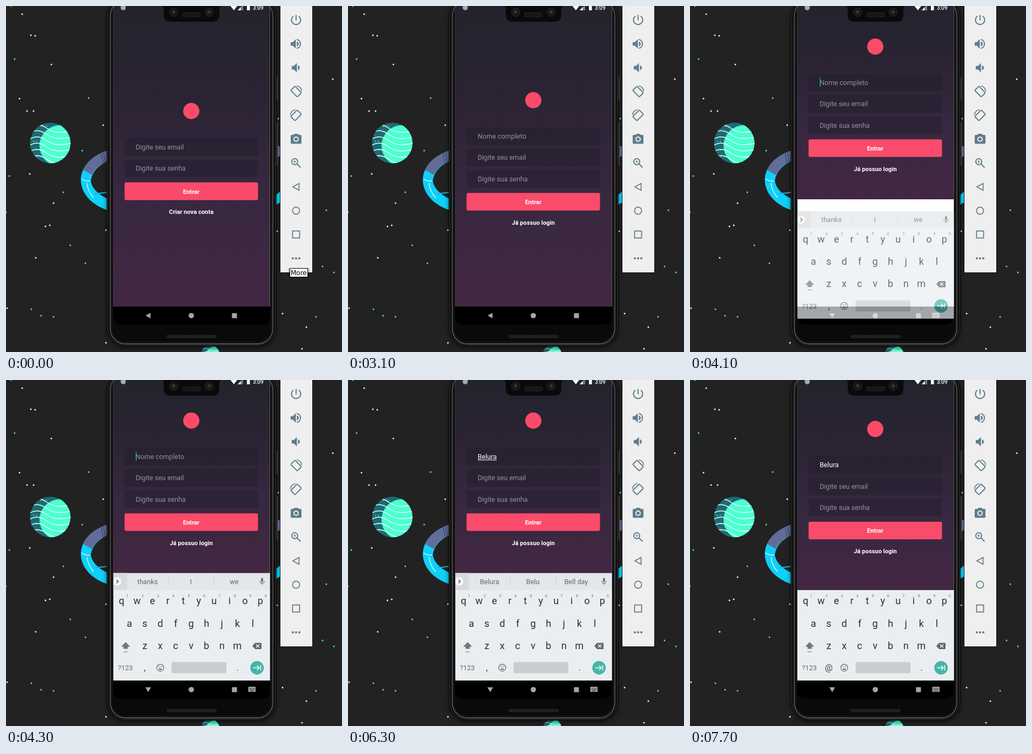
These frames come from a looping animation (622x639 px, 8 s). An HTML page:

```html
<!DOCTYPE html>
<html lang="pt">
<head>
<meta charset="utf-8">
<title>Login</title>
<style>
html, body { margin: 0; width: 100%; height: 100%; overflow: hidden; background: #222; }
svg { display: block; width: 622px; height: 639px; }
text { font-family: Roboto, sans-serif; }
.mid { text-anchor: middle; }
.field { font-size: 12.6px; fill: #fff; }
.hint { fill-opacity: .5; }
.bold { font-size: 11.2px; font-weight: 700; fill: #fff; }
.key { font-size: 18.2px; fill: #263238; }
.digit { font-size: 7.5px; fill: #6d787e; }
.small { font-size: 12.7px; fill: #5d696f; }
.tool { fill: none; stroke: #607d8b; stroke-width: 2; }
.tool .solid { fill: #607d8b; stroke: none; }
.body { filter: drop-shadow(0 3px 4px rgba(0, 0, 0, .55)); }
</style>
</head>
<body>
<svg viewBox="0 0 622 639">
  <defs>
    <linearGradient id="dusk" x1="0" y1="0" x2="0" y2="1">
      <stop offset="0" stop-color="#22242d"/>
      <stop offset=".3" stop-color="#2b2333"/>
      <stop offset=".6" stop-color="#36283f"/>
      <stop offset="1" stop-color="#432743"/>
    </linearGradient>
    <pattern id="mesh" width="4" height="4" patternUnits="userSpaceOnUse">
      <path d="M0 4L4 0" stroke="#3a3a3a"/>
    </pattern>
    <clipPath id="globe"><circle cx="82" cy="253" r="37.5"/></clipPath>
    <clipPath id="moon"><circle cx="378" cy="644" r="17.5"/></clipPath>
    <clipPath id="screen"><rect x="198.800" y="-8" width="289.700" height="596.500" rx="14"/></clipPath>
  </defs>

  <!-- wallpaper -->
  <rect width="622" height="639" fill="#222"/>
  <g id="stars"></g>
  <g clip-path="url(#globe)">
    <rect x="44" y="215" width="76" height="76" fill="#1c6b73"/>
    <circle cx="100" cy="258" r="38" fill="#4dffd1"/>
    <g id="waves" fill="none" stroke="#e9fffa" stroke-width="1.500"></g>
    <path d="M50 250h10M50 266h12M57 278h10M64 222h12" stroke="#bdeee6" stroke-width="1.500" stroke-dasharray="1.5 4"/>
  </g>
  <path d="M188 267C160 276 138 296 138.500 323C140 350 163 369 188 377V356C172 349 158 336 157 322C160 306 170 295 188 286Z" fill="#0fd0fa"/>
  <path d="M188 267C165 275 149 287 143 303L159 312C164 301 174 292 188 286Z" fill="#626c99"/>
  <path d="M176 273l4 17M180 271l4 17" stroke="#343c60" fill="none"/>
  <path d="M140 319q8 6 15 4M150 327q1 14 12 27" stroke="#d8f9ff" stroke-width="1.500" fill="none"/>
  <path d="M164 346l24-3v2l-22 3z" fill="#0fb4df"/>
  <path d="M500 259h7v18l-7 4z" fill="#626c99"/>
  <path d="M500 349l7-6v20l-7 4z" fill="#0fd0fa"/>
  <g clip-path="url(#moon)">
    <rect x="360" y="626" width="36" height="14" fill="#1c6b73"/>
    <circle cx="386" cy="645" r="16" fill="#4dffd1"/>
    <path d="M360 635q9-5 17 0t18 1M366 640q8-5 14 0" stroke="#e9fffa" fill="none"/>
  </g>

  <!-- phone -->
  <path d="M501.500 131v42M501.500 215v80" stroke="#484848" stroke-width="3"/>
  <g fill="none">
    <rect class="body" x="186.500" y="-14" width="314" height="642.500" rx="34" fill="#0c0c0c"/>
    <rect x="188.500" y="-12" width="310" height="638.500" rx="32" stroke="#383838"/>
    <rect x="193" y="-10" width="301" height="634" rx="28" stroke="#6c6c6c" stroke-width="1.300"/>
    <rect x="195.500" y="-8" width="296" height="629" rx="26" fill="#0a0a0a" stroke="#262626" stroke-width=".8"/>
  </g>
  <rect x="297" y="607.500" width="93" height="6" rx="3" fill="#171717"/>
  <rect x="297" y="607.500" width="93" height="6" rx="3" fill="url(#mesh)"/>

  <g clip-path="url(#screen)">
    <rect x="198" y="-8" width="291" height="563" fill="#fff"/>
    <rect id="app" x="198" y="0" width="291" fill="url(#dusk)"/>
    <rect x="198" y="555" width="291" height="34" fill="#000"/>
    <g fill="#a6a6a6">
      <path id="back"/>
      <circle cx="343" cy="571.800" r="4.900"/>
      <rect x="418.300" y="567.300" width="9.200" height="9.200"/>
      <g id="imeIcon"><rect x="448.500" y="566.500" width="13.500" height="9.500" rx="1"/>
        <path d="M450.500 569.500h10M450.500 571.700h10" stroke="#111" stroke-width="1.200" stroke-dasharray="1.200 1"/>
        <path d="M452 574.200h6.500" stroke="#111"/></g>
    </g>
    <g id="form"></g>
    <g id="keyboard">
      <rect x="198" y="388" width="291" height="167" fill="#eaeef1"/>
      <g id="bar">
        <rect x="198" y="356.500" width="291" height="31.500" fill="#e3e7ea"/>
        <rect x="198" y="356.500" width="26" height="31.500" fill="#d7dbdd"/>
        <circle cx="206" cy="372" r="7.500" fill="#fafafa"/>
        <path d="M204.500 368.700l3.300 3.300-3.300 3.300" fill="none" stroke="#444" stroke-width="1.400"/>
        <path d="M300.500 363v18M384.500 363v18" stroke="#cdd2d5"/>
        <rect x="472" y="365.500" width="4" height="8" rx="2" fill="#6d787e"/>
        <path d="M469.800 371.500a4.200 4.200 0 0 0 8.400 0M474 375.700v2.500" fill="none" stroke="#6d787e" stroke-width="1.200"/>
        <g id="words"></g>
      </g>
      <g id="keys"></g>
      <path d="M221.500 484l8.500 8.500h-4.500v4h-8v-4h-4.500z" fill="#6d787e"/>
      <path d="M217.500 502h8" stroke="#6d787e" stroke-width="1.200"/>
      <path d="M461 485.500h12v11.500h-12l-5-5.750z" fill="#5d696f"/>
      <path d="M463 488.500l6 5.500M469 488.500l-6 5.500" stroke="#fff" stroke-width="1.400"/>
      <text class="small mid" x="221" y="536">?123</text>
      <text class="mid" id="comma" x="257" y="537" font-size="16" fill="#37474f"></text>
      <g fill="none" stroke="#5d696f" stroke-width="1.200">
        <circle cx="285.500" cy="531.300" r="6.500"/>
        <path d="M282 533a3.700 3.700 0 0 0 7 0z" fill="#5d696f" stroke="none"/>
        <path d="M282.500 529.300h1.800M286.700 529.300h1.800" stroke-width="1.800"/>
      </g>
      <rect x="306.500" y="521" width="101.500" height="20.500" rx="2" fill="#c8cdd0"/>
      <text class="mid" x="428.500" y="537" font-size="16" fill="#37474f">.</text>
      <circle cx="464.700" cy="531.500" r="12.500" fill="#45b5a8"/>
      <path d="M457.500 531.500h11M464.700 527.300l4.200 4.200-4.200 4.200M471.500 526.800v9.400" fill="none" stroke="#fff" stroke-width="1.500"/>
    </g>
    <circle cx="217" cy="3" r="4.800" fill="#a9a9ad"/>
    <path d="M415.500 0h12.500l-6.200 8z" fill="#fff"/>
    <path d="M439 -3v11h-10z" fill="#77777d"/><path d="M434.500 2v6h-5.500z" fill="#fff"/>
    <rect x="446" y="-2" width="5.500" height="10" fill="#fff"/>
    <text x="457" y="7" font-size="10" font-weight="500" fill="#fff">3:09</text>
  </g>

  <!-- notch -->
  <path d="M288 0h111q-4 1-4 6v10q0 13-13 13h-77q-13 0-13-13v-10q0-5-4-6z" fill="#0a0a0a"/>
  <g fill="#111" stroke="#353535">
    <circle cx="310.500" cy="11.500" r="7.500"/><circle cx="376" cy="11.500" r="7.500"/>
    <circle cx="310.500" cy="11.500" r="3.500" fill="#252525"/><circle cx="376" cy="11.500" r="3.500" fill="#252525"/>
  </g>
  <path d="M309 10h2M375.500 10.500h2" stroke="#888"/>
  <rect x="327" y="12.500" width="33" height="7.500" rx="3.500" fill="url(#mesh)" stroke="#262626"/>

  <!-- emulator toolbar -->
  <rect x="507" y="-2" width="61" height="495" fill="#0d0d0d"/>
  <rect x="508" y="-2" width="59" height="494" fill="#efefef"/>
  <g id="tools"></g>
  <g id="tip">
    <rect x="522" y="484" width="40" height="17" rx="3" fill="#000" opacity=".2"/>
    <rect x="525.500" y="484.500" width="33" height="16" fill="#fff" stroke="#000"/>
    <text x="527" y="497" style="font:12px 'DejaVu Sans',sans-serif">More</text>
  </g>
</svg>

<script>
const $ = id => document.getElementById(id);
const LOOP = 8000;

const white = [30,15, 46,54, 54,55, 84,108, 25,171, 39,194, 51,194, 180,220, 44,310, 88,364, 73,407,
  81,405, 55,465, 2,558, 605,135, 512,568, 556,593, 548,633, 185,414, 502,416, 185,622];
const mint = [9,0, 16,98, 153,170, 141,267, 6,314, 106,344, 119,442, 147,475, 47,560, 65,572, 88,574,
  593,377, 586,481, 607,492, 574,574, 504,208, 0,381];

function dots(list, color) {
  let out = '';
  for (let i = 0; i < list.length; i += 2)
    out += `<circle cx="${list[i]}" cy="${list[i + 1]}" r="1.5" fill="${color}"/>`;
  return out;
}
$('stars').innerHTML = dots(white, '#f4f4f4') + dots(mint, '#4bf0c4');

for (let i = 0; i < 6; i++)
  $('waves').innerHTML += `<path d="M42 ${224 + i * 11.5}c14 -9 24 -5 34 2s22 10 46 4"/>`;

// Keyboard rows: letters, first x, baseline
const rows = [['qwertyuiop', 214, 414], ['asdfghjkl', 228.5, 455.5], ['zxcvbnm', 257, 496.5]];
const label = (cls, x, y, s) => `<text class="${cls}" x="${x}" y="${y}">${s}</text>`;
$('keys').innerHTML = rows.map(([letters, x, y]) =>
  [...letters].map((c, i) => label('key mid', x + 28.55 * i, y, c)).join('')).join('') +
  [...'1234567890'].map((c, i) => label('digit mid', 224.3 + 28.5 * i, 400.5, c)).join('');

// Toolbar icons, drawn around their own centre
const speaker = x => `<path class="solid" d="M${x} -3.200h4l5.500-5.500v17.400l-5.500-5.500h-4z"/>`;
const rotate = `<rect x="-5.500" y="-8.500" width="11" height="17" rx="1.500" transform="rotate(-45)"/>
  <path d="M1-10.500A10.500 10.500 0 0 1 10.500-1" stroke-width="1.700"/>`;
const icons = [
  '<path d="M0-9.500v10M-5-7.200A8.500 8.500 0 1 0 5-7.200"/>',
  speaker(-10) + '<path class="solid" d="M1.500-4.500q3.500 1.500 3.500 4.500t-3.500 4.500z"/><path d="M1.500-8.200a8.400 8.400 0 0 1 0 16.400"/>',
  speaker(-8) + '<path class="solid" d="M3.500-4.500q3.500 1.500 3.500 4.500t-3.500 4.500z"/>',
  rotate,
  `<g transform="scale(-1 1)">${rotate}</g>`,
  `<path class="solid" d="M-3-10h6l2 2h3q2 0 2 2v12.500q0 2-2 2h-16q-2 0-2-2v-12.500q0-2 2-2h3z"/>
   <circle r="4" stroke="#efefef"/>`,
  '<circle cx="-2.500" cy="-2.500" r="5.500"/><path d="M1.800 1.800l6.500 6.500"/><path d="M-5-2.500h5M-2.500-5v5" stroke-width="1.200"/>',
  '<path d="M5.500-6.300v12.600l-11.500-6.300z" stroke-width="1.700"/>',
  '<circle r="6.600" stroke-width="1.700"/>',
  '<rect x="-6.500" y="-6.500" width="13" height="13" stroke-width="1.800"/>',
  '<g class="solid"><circle cx="-6" r="2.100"/><circle r="2.100"/><circle cx="6" r="2.100"/></g>'
];
$('tools').innerHTML = icons.map((s, i) =>
  `<g class="tool" transform="translate(537 ${26 + 44 * i})">${s}</g>`).join('');

// Each step overrides part of the state before it
const steps = [
  [0, { tip: true, hints: ['Digite seu email', 'Digite sua senha'], link: 'Criar nova conta', top: 179,
        bottom: 555, name: '', composing: false, focus: -1, caret: false, ime: false, slide: null,
        alpha: 1, bar: true, comma: ',', words: ['thanks', 'I', 'we'] }],
  [200, { tip: false }],
  [3100, { hints: ['Nome completo', 'Digite seu email', 'Digite sua senha'], link: 'Já possuo login', top: 159 }],
  [3900, { focus: 0, caret: true }],
  [4000, { ime: true }],
  [4100, { top: 60, bottom: 357, slide: 22.5, alpha: .7 }],
  [4200, { slide: 1, alpha: .98 }],
  [4300, { slide: 0, alpha: 1 }],
  [4400, { caret: false }],
  [4900, { name: 'B', composing: true, caret: true, words: ['B', 'But', 'Be'] }],
  [5200, { name: 'Be', words: ['Be', 'Been', 'Best'] }],
  [5300, { name: 'Bel', words: ['Bel', 'Bells', 'Belt'] }],
  [5600, { name: 'Belur', words: ['Belur', 'Below', 'Bell'] }],
  [5700, { name: 'Belura', words: ['Belura', 'Belu', 'Bell day'] }],
  [6300, { caret: false }],
  [6700, { caret: true }],
  [7100, { focus: 1, composing: false }],
  [7200, { top: 75.5, bottom: 388, bar: false, comma: '@' }],
  [7700, { caret: false }]
];
let last = {};
const states = steps.map(([at, change]) => last = { ...last, ...change, at });

const show = (id, on) => $(id).style.display = on ? '' : 'none';

function drawForm(s) {
  const first = s.top + 81.3, gap = 39.4;
  const button = first + gap * (s.hints.length - 1) + 26.1;
  let out = `<circle cx="343" cy="${s.top + 15}" r="15" fill="#fb4b6b"/>`;
  s.hints.forEach((hint, i) => {
    const y = first + gap * i, typed = i === 0 && s.name;
    out += `<rect x="219.500" y="${y - 16.2}" width="247" height="32.400" rx="3" fill="#201e2a" fill-opacity=".45"/>` +
      `<text class="field ${typed ? '' : 'hint'}" x="240" y="${y + 4.4}">${typed || hint}</text>`;
  });
  out += `<rect x="219.500" y="${button}" width="247" height="32.600" rx="3" fill="#fb4b6b"/>` +
    label('bold mid', 343, button + 20.7, 'Entrar') + label('bold mid', 343, button + 58.4, s.link);
  $('form').innerHTML = out;

  const len = s.name ? $('form').querySelector('.field').getComputedTextLength() : 0;
  const y = first + gap * s.focus;
  let marks = '';
  if (s.composing) marks += `<rect x="240" y="${y + 6}" width="${len}" height="1" fill="#fff"/>`;
  if (s.caret) marks += `<rect x="${240 + (s.focus === 0 ? len : 0)}" y="${y - 9}" width="1.600" height="17" fill="#1c998c"/>`;
  $('form').innerHTML += marks;
}

function draw(s) {
  show('tip', s.tip);
  show('imeIcon', s.ime);
  show('keyboard', s.slide !== null);
  show('bar', s.bar);
  $('app').setAttribute('height', s.bottom);
  $('back').setAttribute('d', s.ime ? 'M258 567.500h10.500l-5.250 9z' : 'M267.500 566.800v10l-9-5z');
  $('keyboard').setAttribute('transform', `translate(0 ${s.slide || 0})`);
  $('keyboard').setAttribute('opacity', s.alpha);
  $('comma').textContent = s.comma;
  $('words').innerHTML = s.words.map((w, i) => label('small mid', 262 + 80.2 * i, 376.8, w)).join('');
  drawForm(s);
}

const start = performance.now();
let shown;
function tick() {
  const t = (performance.now() - start) % LOOP;
  const s = states.findLast(x => x.at <= t);
  if (s !== shown) draw(shown = s);
  requestAnimationFrame(tick);
}
tick();
</script>
</body>
</html>
```
